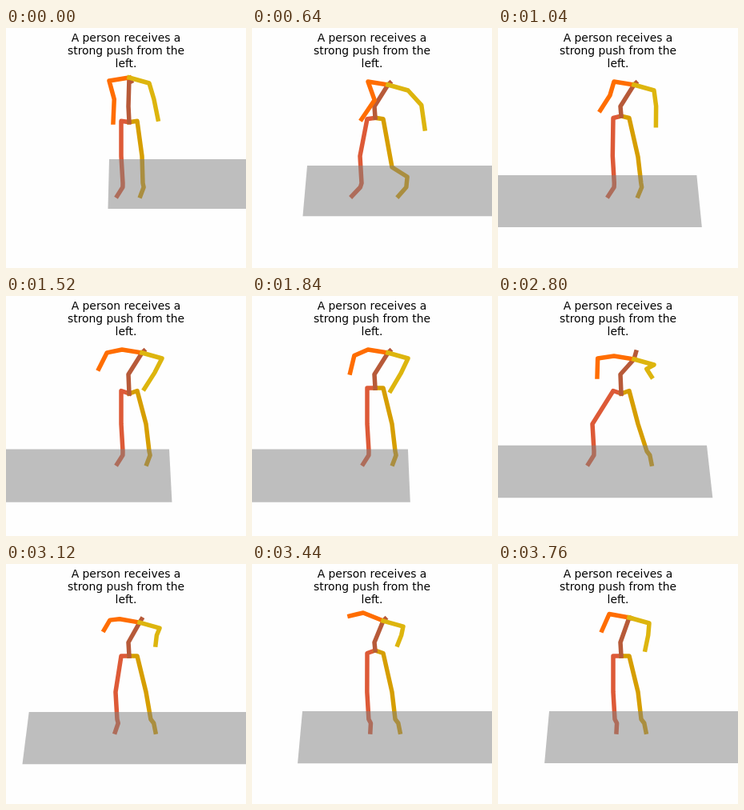
Write an HTML page with a canvas that moves like this. It is 300 px wide and 300 px high and loops after 3.84 s.

```html
<!DOCTYPE html>
<html lang="en">
<head>
<meta charset="utf-8">
<title>Stick figure push</title>
<style>
html, body { margin: 0; width: 100%; height: 100%; overflow: hidden; background: #fefefe; }
canvas { display: block; width: 300px; height: 300px; }
</style>
</head>
<body>
<canvas id="stage" width="300" height="300"></canvas>
<script>
const ctx = document.getElementById('stage').getContext('2d');
const LOOP = 3840, STEP = 80, FLOOR_WIDTH = 285;
const CAPTION = ['A person receives a', 'strong push from the', 'left.'];

// Sparse keys: [time, ...coordinates].
const FLOOR_X = [[0, 129], [240, 125], [640, 69], [1120, -50], [1520, -81],
  [2160, -94], [2800, -24], [3440, 63], [3760, 64]];
const RIGHT_HAND = [[0, 134, 118], [640, 137, 114], [1520, 116, 91], [2240, 132, 103],
  [2800, 124, 101], [3440, 122, 65], [3760, 130, 83]];
const LEFT_HAND = [[0, 190, 114], [640, 216, 126], [1520, 173, 116], [2240, 174, 122],
  [2800, 192, 101], [3440, 182, 101], [3760, 184, 107]];

const lerp = (a, b, u) => a + (b - a) * u;

// Smooth rise from 0 to 1 between two times.
function ease(t, start, end) {
  const u = Math.min(1, Math.max(0, (t - start) / (end - start)));
  return u * u * (3 - 2 * u);
}

// Smooth pulse of height 1 around a time.
const pulse = (t, center, width) => Math.exp(-(((t - center) / width) ** 2));

// Monotone cubic path through the keys.
function follow(keys, t) {
  const last = keys.length - 1;
  let i = 0;
  while (i < last - 1 && keys[i + 1][0] <= t) i++;
  const span = keys[i + 1][0] - keys[i][0];
  const u = (t - keys[i][0]) / span, v = 1 - u;
  return keys[i].slice(1).map((from, n) => {
    const c = n + 1, to = keys[i + 1][c];
    const slope = k => (keys[k + 1][c] - keys[k][c]) / (keys[k + 1][0] - keys[k][0]);
    const tangent = k => {
      if (k === 0) return slope(0);
      if (k === last) return slope(last - 1);
      const a = slope(k - 1), b = slope(k);
      return a * b > 0 ? 2 * a * b / (a + b) : 0;
    };
    return from * v * v * (1 + 2 * u) + to * u * u * (3 - 2 * u)
      + span * u * v * (v * tangent(i) - u * tangent(i + 1));
  });
}

function drawLine(points, color) {
  ctx.strokeStyle = color;
  ctx.beginPath();
  for (const [x, y] of points) ctx.lineTo(x, y);
  ctx.stroke();
}

function drawLeg(pelvis, hipX, knee, ankle, toeX, color) {
  const hip = [hipX, lerp(pelvis[1], 115, 0.5)];
  const heel = [lerp(ankle[0], toeX, 0.3) + 2, 199];
  drawLine([pelvis, hip, knee, ankle, heel, [toeX, 210]], color);
}

// The elbow sits near the middle of the arm, pushed sideways by the bend.
function drawArm(neck, shoulder, hand, bend, color) {
  const dx = hand[0] - shoulder[0], dy = hand[1] - shoulder[1];
  const side = bend / Math.hypot(dx, dy);
  const elbow = [shoulder[0] + 0.45 * dx + side * dy, shoulder[1] + 0.45 * dy - side * dx];
  drawLine([neck, shoulder, elbow, hand], color);
}

function drawFigure(t) {
  const lean = ease(t, 160, 640);
  const recover = ease(t, 2800, 3440);
  const stumble = pulse(t, 640, 250);
  const lunge = pulse(t, 2800, 280);

  const pelvis = [154, 115 + 7 * Math.cos((t - 1520) / LOOP * 6 * Math.PI)];
  const neck = [154 + 16 * lean - 6 * recover,
    62 + 9 * lean + 8 * lunge - 4 * ease(t, 3440, 3760)];
  const head = [neck[0] + 2.5, lerp(neck[1], 68, 0.8)];

  const rightAnkle = 146 - 9 * stumble - 26 * lunge;
  drawLeg(pelvis, 144, [rightAnkle - 2, 160], [rightAnkle, 194],
    rightAnkle - 7 - 5 * stumble + 9 * recover, '#DD5A37');

  const leftAnkle = 171 + 8 * ease(t, 0, 1500) + 20 * stumble + 7 * lunge;
  drawLeg(pelvis, 164, [170 + 5 * lean, 160 + 14 * stumble], [leftAnkle, 194 - 8 * stumble],
    leftAnkle - 3 - 8 * stumble + 9 * ease(t, 2240, 2800), '#D69E00');

  drawLine([pelvis, [153, 98], neck, head], '#B75A39');

  const rightShoulder = [neck[0] - 25, neck[1] + 4 - 8 * lean - 6 * pulse(t, 3440, 200)];
  const rightBend = 4 + 8 * stumble - 13 * ease(t, 900, 1500) - 5 * lunge + 9 * recover;
  drawArm(neck, rightShoulder, follow(RIGHT_HAND, t), rightBend, '#FF6D00');

  const leftShoulder = [neck[0] + 25, neck[1] + 7];
  drawArm(neck, leftShoulder, follow(LEFT_HAND, t), 1 + 7 * stumble - 9 * lunge, '#DDB50E');
}

function drawFloor(t) {
  const [left] = follow(FLOOR_X, t);
  const right = left + FLOOR_WIDTH;
  const top = 164 + 27.5 * ease(t, 160, 1500) - 7.5 * ease(t, 1800, 3500);
  const bottom = top * 1.15 + 37.5;
  const near = x => x + (x - 152) * 0.067;
  ctx.fillStyle = 'rgba(128, 128, 128, 0.5)';
  ctx.beginPath();
  ctx.moveTo(left, top);
  ctx.lineTo(right, top);
  ctx.lineTo(near(right), bottom);
  ctx.lineTo(near(left), bottom);
  ctx.fill();
}

function draw(t) {
  ctx.fillStyle = '#fefefe';
  ctx.fillRect(0, 0, 300, 300);

  ctx.lineWidth = 5.5;
  ctx.lineCap = 'square';
  ctx.lineJoin = 'round';
  drawFigure(t);
  drawFloor(t);

  ctx.fillStyle = '#000';
  ctx.font = '13.89px "DejaVu Sans", sans-serif';
  ctx.textAlign = 'center';
  CAPTION.forEach((line, i) => ctx.fillText(line, 150, 17 + 16 * i));
}

function tick() {
  draw(Math.floor(performance.now() % LOOP / STEP) * STEP);
  requestAnimationFrame(tick);
}
tick();
</script>
</body>
</html>
```
